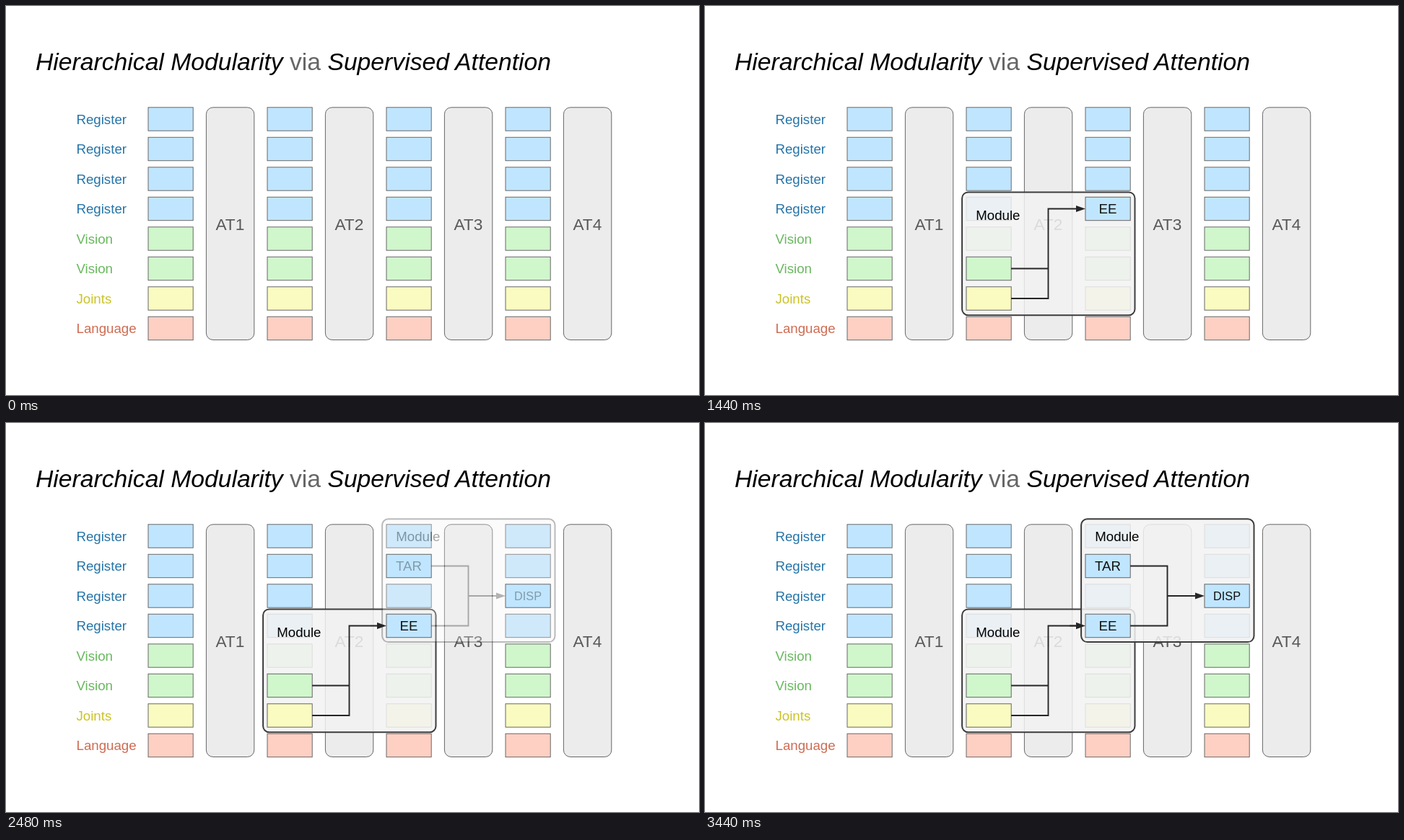
Recreate the animation shown at these times as an HTML page. Size 960 px wide and 540 px high, loop 3520 ms.

```html
<!DOCTYPE html>
<html lang="en">
<head>
<meta charset="utf-8">
<title>Hierarchical Modularity</title>
<style>
  html, body { margin: 0; width: 100%; height: 100%; overflow: hidden; background: #fff; }
  svg { display: block; font: 18.67px "Liberation Sans", Arial, sans-serif; }
  .mid { text-anchor: middle; }
  .panel { fill: #f3f3f3d8; stroke: #3c3c3c; stroke-width: 2; }
  .wire { fill: none; stroke: #262626; stroke-width: 1.9; }
</style>
</head>
<body>
<svg id="stage" width="960" height="540" viewBox="0 0 960 540">
  <text x="41" y="88.7" font-size="33.7" font-style="italic">Hierarchical Modularity <tspan font-style="normal" fill="#666">via</tspan> Supervised Attention</text>
  <g id="grid"></g>
  <g id="lower"></g>
  <g id="upper"></g>
</svg>
<script>
const LOOP = 3520, STEP = 80, FADE = 400;
const PITCH = 165;
const kinds = {
  Register: ['#c0e6ff', '#2474a8'],
  Vision: ['#d0f6cc', '#68b85e'],
  Joints: ['#f9fbc0', '#cbc326'],
  Language: ['#fed0c4', '#cf6b52']
};
const rows = ['Register', 'Register', 'Register', 'Register', 'Vision', 'Vision', 'Joints', 'Language'];
const $ = id => document.getElementById(id);
const rowY = row => 157 + 41.5 * row;

const text = (x, y, str, attrs = '') => `<text x="${x}" y="${y}" ${attrs}>${str}</text>`;

function box(col, row, label = '', size = 18.67) {
  const x = 197 + PITCH * col, y = rowY(row);
  return `<rect x="${x}" y="${y - 16.2}" width="62.2" height="32.4" fill="${kinds[rows[row]][0]}" stroke="#686868"/>` +
    text(x + 31, y + size * 0.36, label, `class="mid" font-size="${size}" fill="#111"`);
}

function layer(col) {
  const x = 277.4 + PITCH * col;
  return `<rect x="${x}" y="140.8" width="66.4" height="322.7" rx="9.5" fill="#ececec" stroke="#666"/>` +
    text(x + 33, 310.7, 'AT' + (col + 1), 'class="mid" font-size="22.7" fill="#595959"');
}

function panel(x, y, labelY) {
  return `<rect class="panel" x="${x}" y="${y}" width="239.4" height="170.8" rx="8.5"/>` +
    text(x + 19.2, labelY, 'Module');
}

// Wire with an arrowhead whose tip touches (x, y).
function arrow(path, x, y) {
  return `<path class="wire" d="${path}H${x - 12}"/>` +
    `<path d="M${x} ${y}l-13 -4.6v9.2z" fill="#262626"/>`;
}

let grid = rows.map((kind, i) => text(99 - 1.5, rowY(i) + 6.5, kind, `fill="${kinds[kind][1]}"`)).join('');
for (let col = 0; col < 4; col++) {
  grid += rows.map((_, row) => box(col, row)).join('') + layer(col);
}
$('grid').innerHTML = grid;

$('lower').innerHTML = panel(356.1, 258.4, 297.4) +
  box(1, 5) + box(1, 6) + box(2, 3, 'EE') +
  arrow('M424 364.5H475.5M424 406H475.5V281.5', 527, 281.5);

$('upper').innerHTML = panel(521.1, 133.3, 163.5) +
  box(2, 1, 'TAR') + box(2, 3, 'EE') + box(3, 2, 'DISP', 16.3) +
  arrow('M589 281.5H640.5V240M589 198.5H640.5V240', 692, 240) +
  arrow('M505 281.5', 527, 281.5);

const fade = (id, t, start) =>
  $(id).setAttribute('opacity', Math.min(1, Math.max(0, (t - start) / FADE)));

function draw(now) {
  const t = Math.floor(now % LOOP / STEP) * STEP;
  fade('lower', t, 960);
  fade('upper', t, 2340);
  requestAnimationFrame(() => draw(performance.now()));
}
draw(0);
</script>
</body>
</html>
```
